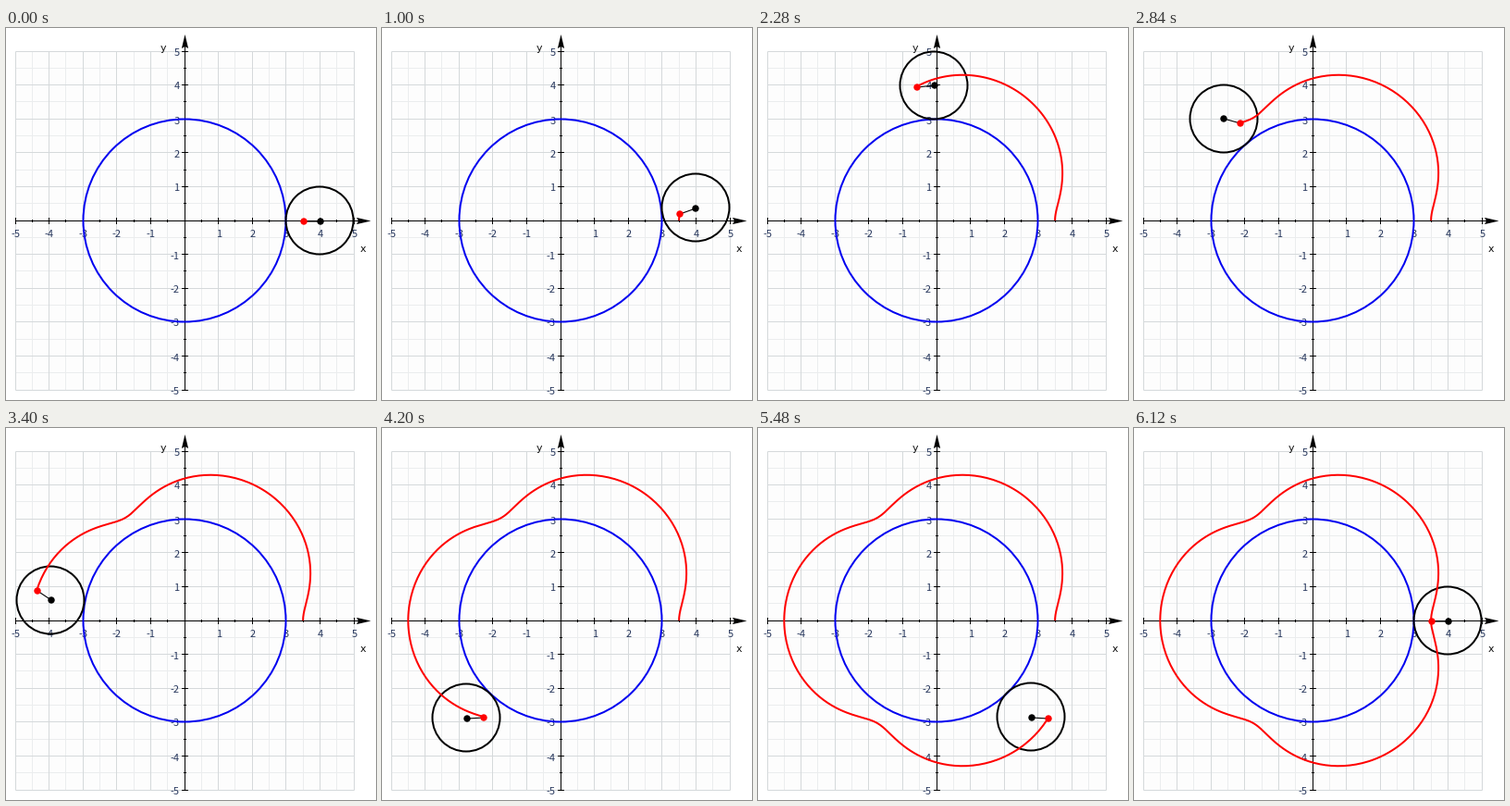
Animation, 400 px wide and 402 px high, one loop 8.12 s. Source, as a matplotlib script:

```python
import numpy as np
import matplotlib.pyplot as plt
from matplotlib.animation import FuncAnimation
from matplotlib.patches import Circle, Polygon

W, H, DPI = 400, 402, 64
PX = 72 / DPI                   # one pixel in points
OX, OY, UNIT = 193, 208, 36.6   # centre of the plot and pixels per unit
R, r, d = 3, 1, 0.5             # fixed circle, rolling circle, arm

TICK_MS, LOOP_MS = 40, 8120
START, STEP, STEPS = 1000, 80, 65

# rolling angle in degrees at a few steps; the speed is slightly uneven
KEY_STEP = [0, 8, 17, 31, 41, 49, 65]
KEY_DEG = [0, 43.6, 91.1, 171.2, 226, 268.9, 360]


def px(x, y):
    return OX + UNIT * x, OY - UNIT * y


def cell(v):
    """Whole pixel that holds a coordinate."""
    return np.floor(np.asarray(v) + 1e-6)


def center(t):
    return (R + r) * np.cos(t), (R + r) * np.sin(t)


def pen(t):
    k = (R + r) / r
    cx, cy = center(t)
    return cx - d * np.cos(k * t), cy - d * np.sin(k * t)


def ring_center(c, radius):
    """Centre of a circle whose bounding box sits on whole pixels."""
    return cell(np.asarray(c) - radius) + cell(2 * radius) / 2 + 0.5


fig = plt.figure(figsize=(W / DPI, H / DPI), dpi=DPI, facecolor="white")
ax = fig.add_axes([0, 0, 1, 1])
ax.set_xlim(0, W)
ax.set_ylim(H, 0)
ax.axis("off")


def line(xs, ys, color, width, z):
    ln, = ax.plot(xs, ys, color=color, lw=width * PX, zorder=z,
                  solid_capstyle="butt", snap=False)
    return ln


def label(x, y, s, size=11, color="#26365c", ha="center",
          family="Noto Sans CJK JP"):
    ax.text(x, y + 4, s, fontsize=size * PX, color=color, ha=ha,
            va="baseline", family=family, zorder=4)


def disc(radius, z, **style):
    return ax.add_patch(Circle((0, 0), radius, zorder=z, **style))


def ring(radius, z, color):
    return disc(cell(2 * radius) / 2, z, fill=False, ec=color, lw=2 * PX)


# grid
mx, my = OX + 0.5, OY + 0.5
x0, y0 = cell(px(-5, 5)) + 0.5
x1, y1 = cell(px(5, -5)) + 0.5
ax.add_patch(Polygon([(x0, y0), (x1, y0), (x1, y1), (x0, y1)],
                     fc="#fdfdfd", ec="none", zorder=0))
for i in range(-10, 11):
    gx, gy = cell(px(i / 2, i / 2)) + 0.5
    major = i % 2 == 0
    color, z = ("#d5d9db", 1.1) if major else ("#ebedee", 1)
    line([gx, gx], [y0, y1], color, 1, z)
    line([x0, x1], [gy, gy], color, 1, z)

    # ticks and numbers
    half = 3.5 if major else 1.5
    if i:
        line([gx, gx], [my - half, my + half], "black", 1, 3)
        line([mx - half, mx + half], [gy, gy], "black", 1, 3)
    if major and i:
        label(gx + 0.3, 221.5, str(i // 2))
        label(187.5, gy + 1, str(i // 2), ha="right")

# axes with arrowheads
line([x0, 384], [my, my], "black", 1, 3)
line([mx, mx], [y1, 16], "black", 1, 3)
ax.add_patch(Polygon([(394.5, my), (379, my - 3.6), (381, my), (379, my + 3.6)],
                     fc="black", ec="none", zorder=3))
ax.add_patch(Polygon([(mx, 7), (mx - 3.6, 22), (mx, 20), (mx + 3.6, 22)],
                     fc="black", ec="none", zorder=3))
label(386, 238.5, "x", color="#111111", family="DejaVu Sans")
label(169.5, 20.7, "y", color="#111111", family="DejaVu Sans")

# curves and moving parts
base = ring(R * UNIT, 5, "#0000f0")
base.center = ring_center((OX, OY), R * UNIT)
wheel = ring(r * UNIT, 6, "black")
trace = line([], [], "#ff0000", 2, 7)
arm = line([], [], "black", 1.1, 8)
hub = disc(3.7, 9, fc="black", ec="none")
tip = disc(3.7, 10, fc="#ff0000", ec="none")


def draw(n):
    ms = n * TICK_MS
    k = 0 if ms < START else min(STEPS, 1 + (ms - START) // STEP)
    t = np.radians(np.interp(k, KEY_STEP, KEY_DEG))
    c, p = px(*center(t)), px(*pen(t))
    wheel.center = ring_center(c, r * UNIT)
    hub.center, tip.center = cell(c) + 1, cell(p) + 1
    arm.set_data(*zip(hub.center, tip.center))
    trace.set_data(*px(*pen(np.linspace(0, t, 2 + 6 * k))))
    return wheel, trace, arm, hub, tip


anim = FuncAnimation(fig, draw, frames=LOOP_MS // TICK_MS, interval=TICK_MS,
                     init_func=lambda: draw(0), repeat=True, repeat_delay=0,
                     blit=False)
plt.show()
```
